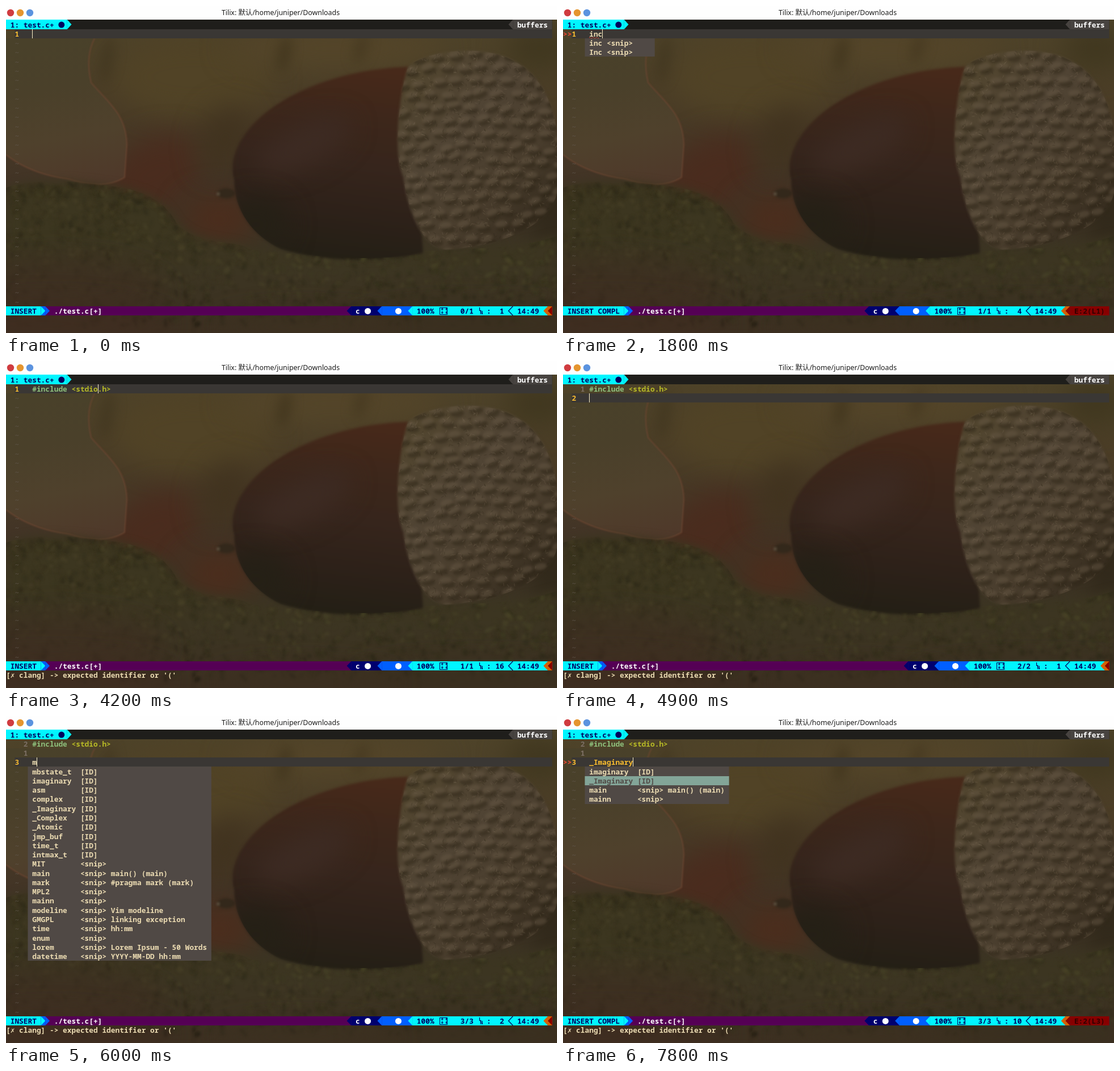
An HTML page with a canvas that plays this animation: 971x576 px, repeating every 8 s.

```html
<!DOCTYPE html>
<html lang="en">
<head>
<meta charset="utf-8">
<title>Terminal completion</title>
<style>
  html, body { margin: 0; width: 100%; height: 100%; overflow: hidden; background: #3e3423; }
  canvas { display: block; width: 971px; height: 576px; }
</style>
</head>
<body>
<canvas id="stage" width="971" height="576"></canvas>
<script>
const W = 971, H = 576, LOOP = 8000;
const CELL = 7.7, LINE = 16.27, TOP = 24.4, COLS = 125, STATUS_ROW = 31;
const MONO = '"Noto Sans Mono", "DejaVu Sans Mono", monospace';
const CREAM = '#ebdbb2', YELLOW = '#fabd2f', RED = '#fb4934', GREY = '#7c6f64';
const PANEL = '#504945', LIME = '#b8bb26', CURSOR_LINE = '#3a3734';
const MODES = {
  INSERT: { main: '#00f5ff', text: '#00005f', mid: '#005fff', dark: '#00006e', dot: '#fff' },
  SELECT: { main: '#f8b300', text: '#100800', mid: '#f55a14', dark: '#5f0a05', dot: '#140a05' }
};
MODES['INSERT COMPL'] = MODES.INSERT;

const ctx = document.getElementById('stage').getContext('2d');

// ---- completion menus ----
function menu(ids, snippets, extra = {}) {
  const items = [
    ...ids.split(' ').filter(Boolean).map(word => [word, '[ID]', '']),
    ...snippets.split(';').map(s => {
      const [word, note = ''] = s.split('=');
      return [word, '<snip>', note];
    })
  ];
  const wordWidth = Math.max(...items.map(i => i[0].length)) + 1;
  const rows = items.map(([word, kind, note]) =>
    (word.padEnd(wordWidth) + kind.padEnd(7) + note).trimEnd());
  const width = Math.max(16, ...rows.map(r => r.length + 2));
  return { rows, width, ...extra };
}
const INTS = 'int8_t int16_t int32_t int64_t intmax_t intptr_t';
const IFNDEF = '#ifndef=#ifndef ... #define ... #endif';
const MENUS = {
  i: menu('if int inline imaginary ' + INTS,
    'if;ife;ifi;inc;Inc;ISC;ifdef;#if=#if #endif;' + IFNDEF + ';MIT;diso=ISO format datetime;' +
    'time=hh:mm;eli=else if .. (eli);elif;main=main() (main);uuid=Random UUID;mainn;' +
    'printf=printf .. (printf);switch;switchndef', { width: 52, thumb: 26 }),
  in: menu('int inline imaginary ' + INTS,
    'inc;Inc;' + IFNDEF + ';main=main() (main);mainn;printf=printf .. (printf);switchndef'),
  inc: menu('', 'inc;Inc'),
  m: menu('mbstate_t imaginary asm complex _Imaginary _Complex _Atomic jmp_buf time_t intmax_t',
    'MIT;main=main() (main);mark=#pragma mark (mark);MPL2;mainn;modeline=Vim modeline;' +
    'GMGPL=linking exception;time=hh:mm;enum;lorem=Lorem Ipsum - 50 Words;datetime=YYYY-MM-DD hh:mm'),
  ma: menu('mbstate_t imaginary _Imaginary intmax_t',
    'main=main() (main);mark=#pragma mark (mark);mainn'),
  mai: menu('imaginary _Imaginary', 'main=main() (main);mainn')
};

// ---- timeline: each step changes part of the editor state ----
const COMPL = 'INSERT COMPL';
const STEPS = [
  [0, { mode: 'INSERT', row: 1, text: '', col: 1, menu: '', pick: -1, wavy: 0 }],
  [1000, { text: 'i', col: 2, menu: 'i' }],
  [1300, { text: 'in', col: 3, menu: '' }],
  [1400, { menu: 'in', sign: true, wavy: 1 }],
  [1600, { mode: COMPL, errors: true, wavy: 2 }],
  [1800, { text: 'inc', col: 4, menu: 'inc' }],
  [1900, { mode: 'INSERT', errors: false }],
  [2100, { mode: COMPL, errors: true, wavy: 3 }],
  [2300, { pick: 0 }],
  [2900, { menu: '', pick: -1, mode: 'INSERT' }],
  [3000, { mode: 'SELECT', included: true, text: '', col: 15, errors: false, sign: false, wavy: 0 }],
  [3100, { message: "[✗ clang] -> expected identifier or '('", pending: '5' }],
  [4200, { mode: 'INSERT', col: 16, pending: '' }],
  [4400, { col: 19 }],
  [4900, { row: 2, col: 1 }],
  [5200, { row: 3 }],
  [6000, { text: 'm', col: 2, menu: 'm' }],
  [6100, { text: 'ma', col: 3, menu: 'ma' }],
  [6300, { text: 'mai', col: 4, menu: '' }],
  [6400, { menu: 'mai' }],
  [6700, { mode: COMPL, errors: true, sign: true, wavy: 3 }],
  [7500, { text: 'imaginary', pick: 0, wavy: 0, col: 10, shownCol: 4 }],
  [7800, { text: '_Imaginary', pick: 1, col: 11, shownCol: 10 }]
];
const stateAt = t => Object.assign({}, ...STEPS.filter(s => s[0] <= t).map(s => s[1]));

// ---- cell grid helpers ----
const rowY = row => TOP + row * LINE;

function fill(col, row, cols, color, rows = 1) {
  const y = Math.round(rowY(row));
  ctx.fillStyle = color;
  ctx.fillRect(col * CELL, y, cols * CELL, Math.round(rowY(row + rows)) - y);
}

function write(col, row, str, color, size = 12.83, dy = 13.2) {
  ctx.font = `bold ${size}px ${MONO}`;
  ctx.fillStyle = color;
  [...str].forEach((ch, i) => ctx.fillText(ch, (col + i) * CELL, rowY(row) + dy));
}

// dir 1 points right, -1 points left
function arrow(col, row, dir, color, outline) {
  const y = Math.round(rowY(row)), end = Math.round(rowY(row + 1));
  const base = (dir > 0 ? col : col + 1) * CELL, tip = base + dir * CELL;
  ctx.beginPath();
  ctx.moveTo(base, y);
  ctx.lineTo(tip, (y + end) / 2);
  ctx.lineTo(base, end);
  ctx.fillStyle = ctx.strokeStyle = color;
  ctx.lineWidth = 1.2;
  outline ? ctx.stroke() : ctx.fill();
}

function disc(x, y, r, color) {
  ctx.fillStyle = color;
  ctx.beginPath();
  ctx.arc(x, y, r, 0, Math.PI * 2);
  ctx.fill();
}
const dotAt = (col, row, color) => disc((col + 0.8) * CELL, rowY(row) + 8.7, 5.5, color);

// ---- wallpaper ----
function paintWallpaper() {
  const canvas = document.createElement('canvas');
  canvas.width = W;
  canvas.height = H;
  const g = canvas.getContext('2d');
  let seed = 7;
  const random = () => (seed = (seed * 16807) % 2147483647) / 2147483647;
  const gradient = (x0, y0, x1, y1, ...colors) => {
    const lg = g.createLinearGradient(x0, y0, x1, y1);
    colors.forEach((c, i) => lg.addColorStop(i / (colors.length - 1), c));
    return lg;
  };
  const blob = (x, y, rx, ry, color, turn = 0) => {
    g.fillStyle = color;
    g.beginPath();
    g.ellipse(x, y, rx, ry, turn, 0, Math.PI * 2);
    g.fill();
  };

  // blurred autumn leaves
  g.fillStyle = gradient(0, 40, 0, H, '#4e4329', '#4a3c26', '#423426', '#3b3423', '#3d3022');
  g.fillRect(0, 0, W, H);
  g.filter = 'blur(24px)';
  blob(330, 125, 140, 70, '#514326');
  blob(580, 75, 190, 35, '#544529');
  blob(260, 295, 90, 60, '#4a2c1e', -0.5);
  blob(375, 375, 65, 45, '#4b2d1d');
  blob(385, 235, 40, 60, '#41331f', 0.4);
  blob(940, 75, 60, 40, '#40371f');
  blob(960, 360, 40, 70, '#30281a');
  g.filter = 'blur(10px)';
  blob(490, 85, 12, 32, '#3f331cb0', 0.2);
  blob(178, 95, 12, 42, '#40351fa0', 0.15);
  blob(625, 75, 12, 28, '#44371fa0', 0.3);
  g.filter = 'none';

  const leaf = new Path2D('M0 57H156C144 80 143 105 150 135C180 170 212 190 213 245L209 302C180 320 145 316 110 305C70 300 30 286 0 262Z');
  g.fillStyle = gradient(80, 57, 130, 315, '#49412a', '#4a402a', '#4f412c', '#4f392a');
  g.fill(leaf);
  g.filter = 'blur(1px)';
  g.strokeStyle = '#6e4632a0';
  g.lineWidth = 2.5;
  g.stroke(new Path2D('M156 57C144 80 143 105 150 135C180 170 212 190 213 245L209 302C180 320 145 316 110 305C70 300 30 286 0 262'));
  g.filter = 'none';

  const mossShape = new Path2D('M0 320C60 300 130 310 190 318C250 325 285 350 300 382C340 425 400 410 430 428C520 440 680 455 740 432C830 425 900 430 971 405V576H0Z');
  g.filter = 'blur(8px)';
  g.fillStyle = gradient(0, 310, 0, H, '#3b351f', '#3c3620', '#3c3422', '#3c2f21');
  g.fill(mossShape);
  g.filter = 'none';

  // acorn
  const nut = new Path2D('M402 305C380 215 520 112 712 107L735 435C670 452 560 452 485 428C435 405 402 360 402 305Z');
  g.filter = 'blur(2px)';
  blob(388, 330, 16, 9, '#33281b');
  blob(374, 331, 2, 2, '#8a7d68');
  g.fillStyle = gradient(590, 105, 545, 445, '#47291a', '#3d271b', '#36251c', '#2d2119', '#231f15');
  g.fill(nut);
  g.save();
  g.clip(nut);
  g.filter = 'blur(22px)';
  blob(525, 245, 90, 35, '#3d2b23', -0.45);
  blob(440, 385, 60, 50, '#252016');
  g.restore();

  const cap = new Path2D('M708 108C738 78 840 66 893 96C945 120 967 180 971 225V330C955 395 860 424 775 429C735 425 708 365 700 300C683 265 690 165 708 108Z');
  g.filter = 'blur(2px)';
  g.fillStyle = gradient(700, 150, 960, 390, '#51452f', '#504434', '#493d2d', '#31281b');
  g.fill(cap);
  g.save();
  g.clip(cap);
  for (let row = 0; row < 16; row++) {
    for (let i = 0; i < 10; i++) {
      const x = 692 + i * 31 + (row % 2) * 16 + random() * 10;
      const y = 78 + row * 23 + random() * 9 + (i - 4) ** 2 * 0.5;
      const turn = -0.4 + random() * 0.5;
      blob(x + 5, y + 8, 12, 6, '#2f25187a', turn);
      blob(x, y, 11, 6, '#6a5b4868', turn);
    }
  }
  g.filter = 'none';
  for (let i = 0; i < 1100; i++) {
    blob(690 + random() * 281, 75 + random() * 355, 3, 0.7, random() < 0.5 ? '#80705a3c' : '#2c22183c', random() * 3);
  }
  g.restore();

  // moss: browner on the left, greener on the right, fading downwards
  g.save();
  g.clip(mossShape);
  for (let i = 0; i < 2600; i++) {
    const x = random() * W, y = 312 + random() ** 1.25 * 250;
    const light = 10 + random() * 14 + x / 400 - Math.max(0, y - 470) / 14;
    blob(x, y, 2 + random() * 6, 1 + random() * 4,
      `hsla(${42 + x / 90 + random() * 8}, 30%, ${light}%, .36)`, random() * 3);
  }
  g.filter = 'blur(22px)';
  blob(90, 500, 190, 55, '#3f2f219c');
  blob(70, 560, 220, 35, '#402d21cc');
  blob(830, 560, 210, 30, '#3a3020cc');
  blob(530, 565, 160, 24, '#3d3121cc');
  g.restore();
  return canvas;
}
const wallpaper = paintWallpaper();

// ---- window parts ----
function drawTitleBar() {
  ctx.fillStyle = '#fefefe';
  ctx.fillRect(0, 0, W, 24);
  ['#d03c40', '#e5952f', '#5b93df'].forEach((c, i) => disc(8 + i * 17, 12, 6.2, c));
  ctx.fillStyle = '#1c1c1c';
  ctx.font = '12.4px "Noto Sans", "Noto Sans CJK SC", "Noto Sans CJK", sans-serif';
  ctx.textAlign = 'center';
  ctx.fillText('Tilix: 默认/home/juniper/Downloads', 484, 16);
  ctx.textAlign = 'left';
}

function drawTabs() {
  const { main, text } = MODES.INSERT;
  fill(0, 0, COLS, '#1f1e1b');
  fill(0, 0, 14, main);
  arrow(14, 0, 1, main);
  write(1, 0, '1: test.c+', text);
  dotAt(11.9, 0, text);
  arrow(115, 0, -1, '#474340');
  fill(116, 0, 9, '#474340');
  write(117, 0, 'buffers', '#fff');
}

function drawBuffer(s) {
  const selecting = s.mode === 'SELECT';
  fill(2, s.row, selecting ? 3 : COLS - 2, CURSOR_LINE);
  for (let r = s.row + 1; r < STATUS_ROW; r++) write(2, r, '~', '#665c5499');
  for (let r = 1; r < s.row; r++) write(4, r, String(s.row - r), GREY);
  write(2, s.row, String(s.row), YELLOW);
  if (s.sign) write(0, s.row, '>>', RED);

  if (s.included) {
    write(6, 1, '#include', '#8ec07c');
    write(15, 1, '<stdio.h>', LIME);
    if (selecting) {
      fill(16, 1, 5, LIME);
      write(16, 1, 'stdi', '#665c45');
      write(20, 1, 'o', '#32302f');
    }
  }
  write(6, s.row, s.text, s.text === '_Imaginary' ? YELLOW : CREAM);
  ctx.fillStyle = RED;
  for (let x = 0; x < s.wavy * CELL; x += 3) {
    ctx.fillRect(6 * CELL + x, rowY(s.row) + 14.4 + (x / 3) % 2, 2, 1);
  }
  if (!selecting) {
    ctx.fillStyle = '#fbf1c7';
    ctx.fillRect(Math.round((5 + s.col) * CELL), Math.round(rowY(s.row)), 1, 16);
  }
}

function drawStatus(s) {
  const { main, text, mid, dark, dot } = MODES[s.mode];
  const row = STATUS_ROW, end = s.mode.length + 2, a = s.errors ? 69 : 78;
  const put = (col, str, color = text) => write(col, row, str, color);
  fill(0, row, COLS, '#550055');
  fill(0, row, end, main);
  fill(end, row, 1, mid);
  arrow(end, row, 1, main);
  arrow(end + 1, row, 1, mid);
  put(1, s.mode);
  put(end + 3, './test.c[+]', '#fff');

  let col = a;
  for (const [color, width] of [[dark, 7], [mid, 7], [main, 31], ['#d75f00', 1], ['#870000', COLS - a - 46]]) {
    arrow(col, row, -1, color);
    fill(col + 1, row, Math.min(width, COLS - col - 1), color);
    col += width;
  }
  put(a + 2, 'c', '#fff');
  dotAt(a + 4, row, '#fff');
  dotAt(a + 11, row, dot);
  put(a + 16, '100%');
  const x = (a + 21.2) * CELL, y = rowY(row);
  ctx.strokeStyle = text;
  ctx.lineWidth = 1;
  ctx.strokeRect(Math.round(x) + 0.5, Math.round(y) + 2.5, 13, 12);
  [7.2, 13].forEach(dy => write(a + 21.6, row, '00', text, 6, dy));
  const line = s.row === 1 && !s.text && !s.included ? 0 : s.row;
  put(a + 26, `${line}/${s.row}`);
  write(a + 30.2, row, 'L', text, 8, 8);
  write(a + 30.5, row, 'N', text, 8, 14.5);
  put(a + 32, ':');
  put(a + 34, String(s.shownCol || s.col).padStart(2));
  arrow(a + 37, row, -1, text, true);
  put(a + 39, '14:49');
  if (s.errors) put(117, `E:2(L${s.row})`, '#300000');

  if (s.message) write(0, row + 1, s.message, CREAM);
  if (s.pending) write(114, row + 1, s.pending, CREAM);
}

function drawMenu(s) {
  if (!s.menu) return;
  const { rows, width, thumb } = MENUS[s.menu];
  const first = s.row + 1;
  fill(5, first, width, PANEL, rows.length);
  rows.forEach((str, i) => {
    const picked = i === s.pick;
    if (picked) fill(5, first + i, width, '#83a598');
    write(6, first + i, str, picked ? PANEL : CREAM);
  });
  if (thumb) fill(4 + width, first, 1, GREY, thumb);
}

function draw() {
  const s = stateAt(performance.now() % LOOP);
  ctx.drawImage(wallpaper, 0, 0);
  drawTitleBar();
  drawTabs();
  drawBuffer(s);
  drawStatus(s);
  drawMenu(s);
  requestAnimationFrame(draw);
}
draw();
</script>
</body>
</html>
```
